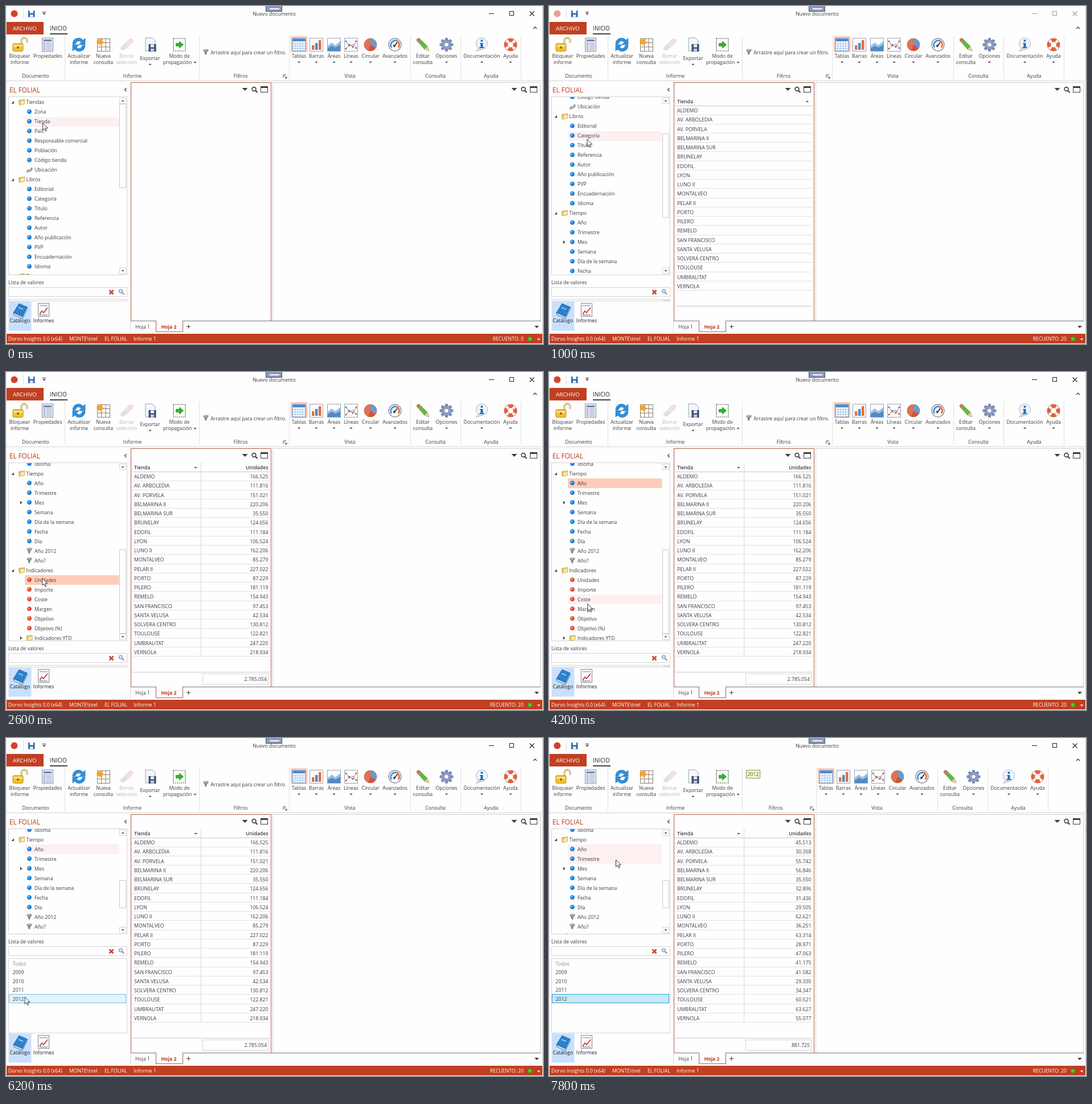
Recreate the animation shown at these times as an HTML page. Size 943 by 594 pixels, loop 8 s.

```html
<!DOCTYPE html>
<html lang="es">
<head>
<meta charset="utf-8">
<title>Nuevo documento</title>
<style>
html, body { margin: 0; width: 100%; height: 100%; overflow: hidden; background: #fefefe; }
svg { display: block; width: 943px; height: 594px; font: 8.7px "Open Sans", "Noto Sans", sans-serif; }
</style>
</head>
<body>
<svg id="stage" viewBox="0 0 943 594"></svg>
<script>
const ACCENT = '#c13f22', EDGE = '#ad5c49', INK = '#3c3c3c', LINE = '#d4d4d4', PAPER = '#fefefe';
const LOOP = 8000, STEP = 200;

// Drawing helpers; text is placed by its vertical centre.
const text = (x, y, s, o = {}) =>
  `<text x="${x}" y="${y + (o.size || 8.7) * 0.37}" fill="${o.fill || INK}" text-anchor="${o.anchor || 'start'}"` +
  ` font-size="${o.size || 8.7}" font-weight="${o.weight || 400}">${s}</text>`;
const mid = (x, y, s, o) => text(x, y, s, { anchor: 'middle', ...o });
const rect = (x, y, w, h, fill = 'none', stroke = 'none', rx = 0) =>
  `<rect x="${x}" y="${y}" width="${w}" height="${h}" rx="${rx}" fill="${fill}" stroke="${stroke}"/>`;
const path = (d, fill = 'none', stroke = 'none', w = 1) =>
  `<path d="${d}" fill="${fill}" stroke="${stroke}" stroke-width="${w}"/>`;
const line = (x1, y1, x2, y2, stroke = LINE, w = 1) => path(`M${x1} ${y1}L${x2} ${y2}`, 'none', stroke, w);
const dot = (x, y, r, fill, stroke = 'none', w = 1) =>
  `<circle cx="${x}" cy="${y}" r="${r}" fill="${fill}" stroke="${stroke}" stroke-width="${w}"/>`;
const at = (x, y, s, extra = '') => `<g transform="translate(${x} ${y}) ${extra}">${s}</g>`;
const down = (x, y, r = 3, fill = INK) => path(`M${x - r} ${y - r / 2}h${2 * r}l${-r} ${r}z`, fill);
const up = (x, y, r = 3) => path(`M${x - r} ${y + r / 2}h${2 * r}l${-r} ${-r}z`, INK);

const funnel = path('M-4.5 -3.5Q0 -6 4.5 -4L1 1 .5 4.5 -1.5 3V.5Z', '#8d8d8d', '#5a5a5a', .7) + line(-3, -3.3, 2.5, -3.6, '#e6e6e6', 1.2);
const lens = (colour, w) => dot(-1, -1, 3.4, 'none', colour, w) + line(1.5, 1.5, 5, 5, colour, w + .5);
const finder = line(0, 0, 4.5, 4.5, '#c08a45', 2) + dot(-1.5, -1.5, 3, '#cfe5fa', '#5f97d2', 1.1);
const folder = path('M-5 -3L-1 -4.5 0 -3.5 5 -5V3L-4 5Z', '#edc95c', '#b08b35', .7) + path('M-2 -2L5 -4V3L-3 5Z', '#fde9a0', '#c09b45', .5);
const sheet = path('M-8 -12H4L9 -7V11H-8Z', '#f4f6fa', '#8f99aa', .9);
const box = rect(-11.5, -11.5, 23, 23, PAPER, '#98a3b2');
const bars = (heights, colours) => heights.map((h, i) => rect(-8 + i * 6, 9 - h, 4.5, h, colours[i])).join('');

const icons = {
  lock: path('M3 -2V-7a5 5 0 0 1 10 0v4', 'none', '#a58d45', 2.8) + path('M3 -2V-7a5 5 0 0 1 10 0v4', 'none', '#f1e0a0', 1.5) +
    rect(-12, -2, 18, 13.5, '#efc032', '#b98e1c', 2) + rect(-11, 0, 16, 4, '#fbdc70') + dot(-3, 5, 1.8, '#70510b'),
  props: rect(-9.5, -12, 19, 24, '#e4e7f3', '#8a94b2') + rect(-7, -9, 14, 3, '#7383aa') +
    [-3, 0, 3, 6, 9].map(y => line(-7, y, -4, y, '#6f80a8', 1.2) + line(-2, y, 7, y, '#98a3bf', 1)).join(''),
  refresh: [0, 180].map(a => `<g transform="rotate(${a})">` +
    path('M-11 -1C-11 -12 2 -15 7 -8L11 -11V0H0L4 -4C0 -9 -5 -6 -6 -1Z', '#2f90dc', '#1c6cb2', .6) + '</g>').join(''),
  grid: rect(-10.5, -10.5, 22, 22, PAPER, '#8d7d70') + [-3.5, 4].map(v => line(v, -10, v, 11, '#8d7d70') + line(-10, v, 11, v, '#8d7d70')).join('') +
    path('M-6 -12L-4.5 -8.5 -1 -10 -2 -6.5 1 -5 -2 -3.5 -1 0 -4.5 -1.5 -6 2 -7.5 -1.5 -11 0 -10 -3.5 -13 -5 -10 -6.5 -11 -10 -7.5 -8.5Z', '#f6a51d'),
  eraser: path('M-11 6L4 -9Q7 -12 11 -8 12 -6 10 -4L-4 9Q-9 11 -11 6Z', '#f5e0db', '#dfcac5', .7) + path('M-11 6L-4 -1 3 3 -4 9Q-9 11 -11 6Z', '#dfdfe9'),
  exporter: sheet + rect(-2, -.5, 12, 12, '#46557a', '#33405f') + rect(1, -.5, 6, 5, '#e8edf6') + rect(1, 7, 6, 4.5, '#c6d0e2'),
  spread: `<rect x="-10.5" y="-11" width="21" height="22" fill="#f7fff4" stroke="#3d4b3d" stroke-width="1.2" stroke-dasharray="2 1.5"/>` +
    path('M-6 -2.5H0V-6L7 0 0 6V2.5H-6Z', '#35b22b', '#1f7f1b', .7),
  table: rect(-11.5, -11, 23, 22, PAPER, '#4b80bd') + rect(-11, -10.5, 22, 4.5, '#4a8ad0') +
    [-1.5, 2.5, 6.5].map(y => line(-11, y, 11, y, '#90b5df', .8)).join('') + [-7, -2.5, 2, 6.5].map(x => line(x, -6, x, 11, '#90b5df', .8)).join(''),
  bars: box + bars([8, 12, 17], ['#e3703d', '#4a8ac8', '#e3703d']),
  areas: box + path('M-11 2L-4 -4 2 1 11 -6V11H-11Z', '#96c0e6') + path('M-11 6L-4 2 3 5 11 0V11H-11Z', '#4f8bc6'),
  lines: box + path('M-9 7L-3 0 3 4 9 -6', 'none', '#d7603f', 1) + path('M-9 -6L-3 3 3 -1 9 6', 'none', '#6b7b99', 1) +
    [[-9, 7], [-3, 0], [3, 4], [9, -6], [-9, -6], [9, 6]].map(([x, y]) => dot(x, y, 1.3, '#6b4250')).join(''),
  pie: dot(0, 0, 11, '#e0744f', '#a95c44', .7) + path('M0 0V-11A11 11 0 0 1 9 6Z', '#6b9ace') + path('M0 0L9 6A11 11 0 0 1 -4 10Z', '#d8503a'),
  gauge: dot(0, 0, 11, '#f7f9fc', '#8b95a2', 1.4) + path('M-6 5A8 8 0 0 1 3 -7', 'none', '#4590d4', 2.6) + path('M3 -7A8 8 0 0 1 6 5', 'none', '#e2694a', 2.6) +
    line(-2, 4, 4, -4, '#333', 1.8) + dot(-1, 2, 2, '#444'),
  pencil: path('M-11 -8Q-10 -12 -6 -11L8 3 11 11 3 8Z', '#6ab643', '#418429', .7) + path('M3 8L8 3 11 11Z', '#f1cf94') + path('M-11 -8Q-10 -12 -6 -11L-4 -9 -9 -4Z', '#e46c60'),
  gear: [0, 45, 90, 135].map(a => `<rect x="-2.5" y="-12" width="5" height="24" rx="1" fill="#7c8eb6" transform="rotate(${a})"/>`).join('') +
    dot(0, 0, 8.5, '#8f9ec4', '#6d7da4') + dot(0, 0, 4, PAPER, '#6d7da4'),
  info: path('M-6 6L-10 12 1 8Z', '#d9e3f1', '#9aabc1', .7) + dot(0, -2, 10, '#eef3fb', '#a9b7ca') + dot(0, -7, 2, '#236dbb') + path('M-3 -3H2V4H4V6H-4V4H-2V-1H-3Z', '#236dbb'),
  buoy: dot(0, 0, 8, 'none', '#e75f3b', 6.5) + `<circle r="8" fill="none" stroke="#f6f6f6" stroke-width="6.5" stroke-dasharray="4.5 8.07" stroke-dashoffset="-4"/>` + dot(0, 0, 11, 'none', '#bd5a40', .6),
};

const button = (x, icon, label, opts = {}) => at(x, 68, icons[icon]) +
  label.split('|').map((s, i) => mid(x, (opts.y || 88) + i * 11, s, { fill: opts.fill })).join('') +
  (opts.arrow ? down(x, opts.arrow, 2.6) : '');
const divider = x => line(x, 52, x, 128, '#e0e0e0');

const paneTools = x => down(x, 146.5, 5) + at(x + 17, 147, lens(INK, 1.6)) +
  rect(x + 28, 141.5, 12, 10, PAPER, INK) + rect(x + 27.5, 141, 13, 3, INK);

const ribbonLeft = button(24, 'lock', 'Bloquear|informe') + button(73, 'props', 'Propiedades') + divider(103.5) +
  button(128, 'refresh', 'Actualizar|informe') + button(171, 'grid', 'Nueva|consulta') +
  button(212, 'eraser', 'Borrar|selección', { fill: '#b9b9b9' }) + button(253, 'exporter', 'Exportar', { y: 92, arrow: 103 }) +
  button(304.5, 'spread', 'Modo de') + mid(301, 99, 'propagación') + down(332, 99.5, 2.6) + divider(339.5) +
  mid(52, 123, 'Documento') + mid(222, 123, 'Informe');

const menu = { arrow: 99 };
const ribbonRight = path('M487 126V121H492M489 123L493 127M493 124V127H490', 'none', INK, .9) + divider(497.5) +
  rect(500, 53, 29.5, 28, '#ffcdb9') + button(514.5, 'table', 'Tablas', menu) + button(545, 'bars', 'Barras', menu) +
  button(576, 'areas', 'Áreas', menu) + button(606, 'lines', 'Líneas', menu) + button(640, 'pie', 'Circular', menu) +
  button(683, 'gauge', 'Avanzados', menu) + divider(710.5) + button(732, 'pencil', 'Editar|consulta') +
  button(773.5, 'gear', 'Opciones', menu) + divider(798.5) + button(835.5, 'info', 'Documentación', menu) +
  button(886, 'buoy', 'Ayuda', menu) + divider(904.5) + mid(604, 123, 'Vista') + mid(754, 123, 'Consulta') + mid(852, 123, 'Ayuda');

const chrome = rect(0, 0, 943, 594, PAPER) + line(30.5, 4, 30.5, 23, '#ddd') +
  rect(456.5, -.5, 28, 10, '#8d9abb', '#414d70') + rect(463, 4, 17, 2, '#fff') +
  mid(471, 14, 'Nuevo documento', { size: 8.8 }) +
  rect(1, 28, 65, 22, ACCENT) + mid(33, 39.5, 'ARCHIVO', { size: 9.8, fill: '#fff' }) +
  mid(92, 39.5, 'INICIO', { size: 9.9, fill: '#222' }) + rect(77, 48, 31, 2, '#444') +
  path('M926 40L929 37 932 40', 'none', INK, 1.3) + line(0, 131.5, 943, 131.5, LINE) + ribbonLeft +
  text(6, 148, 'EL FOLIAL', { size: 11.8, fill: '#b83a1d' }) + path('M211.5 144L208.5 147 211.5 150', 'none', INK, 1.2) +
  rect(219.5, 134.5, 246, 419, PAPER, EDGE) + rect(468.5, 134.5, 470, 419, PAPER, '#cfcfcf') + paneTools(419.5) + paneTools(892.5) +
  line(219, 553.5, 939, 553.5, '#777') + line(218.5, 554, 218.5, 573, LINE) + mid(240, 564, 'Hoja 1') +
  path('M263.5 553V572.5H310.5V553', PAPER, EDGE) + mid(286, 564, 'Hoja 2', { weight: 700, fill: '#b23a1f' }) +
  path('M317 563.5H324M320.5 560V567', 'none', INK, 1.1) + down(932, 564, 4) +
  rect(4.5, 519.5, 40, 51, '#c9e0fc') +
  at(25, 536, path('M-12 3L-2 -13 12 -7 4 10Z', '#2a82cc', '#155898', .8) + path('M-12 3L4 10 12 -7V-3L4 13 -11 7Z', '#d9e8f5', '#165b9b', .8) + line(-3, -6, 5, -3, '#a9d6fa', 1.6)) +
  mid(24.5, 553, 'Catálogo', { fill: '#1c1c1c' }) +
  at(66, 534, rect(-9.5, -11.5, 19, 23, PAPER, '#7b8697') + rect(-7, -9, 14, 3, '#c3ccd9') + path('M-7 8L-3 2 0 5 7 -4', 'none', '#cf302c', 1.6) + line(-7, 9, 7, 9, '#666')) +
  mid(66, 553, 'Informes', { fill: '#1c1c1c' }) + rect(1, 576, 941, 17, ACCENT) +
  [[4, 'Dorvo Insights 0.0 (x64)'], [111, 'MONTE\\tirel'], [173, 'EL FOLIAL'], [224, 'Informe 1']].map(([x, s]) => text(x, 585, s, { fill: '#fff' })).join('') +
  dot(920, 585, 3.8, '#4fcb2d', '#2f8a1c') + down(935.5, 586, 2.8, '#fff') +
  line(.5, 0, .5, 575, '#e2e2e2') + line(942.5, 0, 942.5, 575, '#c9c9c9');

// '#' folder, '>' and '@' collapsed branches, '~' location, '?' filter, '*' measure.
const tree = ('#Tiendas,Zona,Tienda,País,Responsable comercial,Población,Código tienda,~Ubicación,' +
  '#Libros,Editorial,Categoría,Título,Referencia,Autor,Año publicación,PVP,Encuadernación,Idioma,' +
  '#Tiempo,Año,Trimestre,>Mes,Semana,Día de la semana,Fecha,Día,?Año 2012,?Año?,' +
  '#Indicadores,*Unidades,*Importe,*Coste,*Margen,*Objetivo,*Objetivo (%),@Indicadores YTD').split(',');
const ROW = 17, STORE = 2, YEAR = 19, UNITS = 29;
const ball = (fill, rim) => dot(41, -.4, 3.6, fill, rim, .7) + dot(40, -1.7, 1.4, '#ffffff80');
const branch = path('M25 -3L28.5 0 25 3Z', INK);

function treeRow(item, y) {
  const kind = '#>~?*@'.includes(item[0]) ? item[0] : '';
  const name = kind ? item.slice(1) : item;
  const blue = ball('#1b88ea', '#1268bd');
  const glyph = {
    '#': path('M14 -2V2.5H9.5Z', INK) + at(27.5, 0, folder),
    '@': branch + at(41, 0, folder),
    '>': branch + blue,
    '~': path('M36 3Q38 -1 41 0T45 -4Q48 -1 43 2T36 3Z', '#ccc', '#666', 1),
    '?': at(41, 0, funnel),
    '*': ball('#ee5233', '#bd3a22'),
  }[kind] || blue;
  return at(0, y, glyph + text(kind === '#' ? 35.5 : 50, 0, name));
}

const stores = ('ALDEMO,AV. ARBOLEDIA,AV. PORVELA,BELMARINA II,BELMARINA SUR,BRUNELAY,EDOFIL,LYON,LUNO II,MONTALVEO,' +
  'PELAR II,PORTO,PILERO,REMELO,SAN FRANCISCO,SANTA VELUSA,SOLVERA CENTRO,TOULOUSE,UMBRALITAT,VERNOLA').split(',');
const allUnits = [166525, 111816, 151021, 220206, 35550, 124656, 111184, 106524, 162206, 85279,
  227022, 87229, 181119, 154943, 97453, 42534, 130812, 122821, 247220, 218934];
const yearUnits = [45513, 30358, 55742, 56846, 35550, 32896, 31436, 29505, 62621, 36251,
  63314, 28971, 47063, 41175, 41582, 29330, 34347, 60521, 63627, 55077];
const dotted = n => String(n).replace(/\B(?=(\d{3})+$)/g, '.');

function drawTable(units, total) {
  const right = { anchor: 'end' }, pitch = 16.24;
  let s = text(225, 167.5, 'Tienda', { weight: 600 }) + up(units ? 333 : 453.5, 167.5, 2.7) +
    line(222, 175.5, 463, 175.5, '#c8c8c8') + line(222, 527.5, 463, 527.5, '#c8c8c8');
  stores.forEach((name, i) => {
    const y = 184 + i * pitch, rule = Math.floor(y + 8) - .5;
    s += text(225, y, name, { size: 8.8 }) + line(222, rule, 463, rule, '#e1e1e1');
    if (units) s += text(460.5, y, dotted(units[i]), right);
  });
  if (units) s += text(460.5, 167.5, 'Unidades', { ...right, weight: 600 }) + line(342.5, 159, 342.5, 500, '#d8d8d8') +
    rect(345.5, 530.5, 115, 18, PAPER, LINE) + text(458, 539.5, dotted(total), right);
  return s;
}

// Keys are [ms, value...]; values run linearly between them.
function tween(keys, t) {
  const i = keys.findIndex(k => k[0] > t);
  if (i < 0) return keys[keys.length - 1].slice(1);
  if (!i) return keys[0].slice(1);
  const a = keys[i - 1], b = keys[i], p = (t - a[0]) / (b[0] - a[0]);
  return a.slice(1).map((v, j) => v + (b[j + 1] - v) * p);
}
const pointerKeys = [[600, 64.5, 205.5], [1000, 67, 234], [1200, 67, 240], [2000, 64, 362.5], [2600, 64, 362.5], [3200, 66, 197],
  [3600, 66, 197], [3800, 66, 240], [4200, 68, 407.5], [4600, 78, 476], [4800, 78, 477], [5000, 78, 477], [5400, 73.5, 473],
  [5800, 68, 345.5], [6200, 33, 455], [6600, 33, 455], [7200, 440, 85], [7400, 531, 68], [7800, 117.5, 214]];
const scrollKeys = [[800, 0], [1000, 111], [1200, 111], [1800, 296.5]];
const splitKeys = [[5400, 472.5], [5800, 344.5]];

const arrow = path('M0 0V12.5L2.9 9.9 4.8 14.4 6.8 13.5 4.9 9.1H8.8Z', '#fff', '#222', .9);
const resizer = path('M0 -8L4 -4H1V4H4L0 8 -4 4H-1V-4H-4Z', '#fff', '#222', 1) + line(-4, 0, 4, 0, '#222', 1.6);
const clip = (id, x, y, w, h) => `<clipPath id="${id}">${rect(x, y, w, h)}</clipPath>`;

function drawTitle(active) {
  const ink = active ? '#222' : '#999';
  return dot(14.5, 13.5, 6, active ? '#d6412b' : '#ea9f94') +
    rect(39, 8, 11.5, 11.5, '#2a67b2') + rect(41.5, 8, 6.5, 4.5, '#fff') + rect(42, 15, 5.5, 4.5, '#e4edf8') +
    line(64, 10.5, 70, 10.5, INK) + down(67, 14, 3) + line(848, 13.5, 857, 13.5, ink) +
    rect(884.5, 9.5, 7, 7, 'none', ink) + path('M919.5 9.5L927.5 17.5M927.5 9.5L919.5 17.5', 'none', ink, 1.1);
}

function drawTree(t, split, scroll, x, y) {
  const view = split - 159.5, track = view - 25, whole = tree.length * ROW;
  const selected = t < 200 ? -1 : t < 2200 ? STORE : t < 3600 ? UNITS : YEAR;
  const dragging = t >= 6600 && t < 7200;
  const over = !dragging && x > 18 && x < 199 && y > 160 && y < split ? Math.floor((y + scroll - 160.5) / ROW) : -1;
  let rows = '';
  tree.forEach((item, i) => {
    const rowY = 169 + i * ROW - scroll;
    if (rowY < 150 || rowY > split + 10) return;
    const strong = i === selected && t < 6000;
    if (strong || i === selected || i === over) rows += rect(33, Math.round(rowY - 8.5), 165.5, ROW, strong ? '#ffcdb9' : '#fdf0f1');
    rows += treeRow(item, rowY);
  });
  return clip('treeClip', 5, 160, 194, view - 1) + rect(4.5, 159.5, 208, view, PAPER, LINE) +
    `<g clip-path="url(#treeClip)">${rows}</g>` +
    rect(199.5, 161.5, 11, 10, PAPER, LINE) + up(205, 166.5, 2.5) +
    rect(199.5, split - 12, 11, 10, PAPER, LINE) + down(205, split - 7, 2.5) +
    rect(199.5, Math.round(172 + track * scroll / whole) + .5, 11, Math.round(track * view / whole), PAPER, '#cacaca');
}

function drawValues(t, split, x, y) {
  const top = split + 43, height = 518.5 - top;
  const filled = (t >= 400 && t < 2200) || t >= 3600;
  let s = text(4, split + 13.5, 'Lista de valores') + rect(4.5, split + 22, 208, 16, PAPER, LINE) +
    path(`M181.5 ${split + 27}l7 7m0 -7l-7 7`, 'none', '#c9433b', 2.6) + at(203, split + 30, finder) +
    rect(4.5, top, 208, height, PAPER, LINE);
  if (height < 20) return s + (filled ? rect(200, top + 1, 12, 2, '#d9d9d9') : '');
  const rows = ['Todos', 2009, 2010, 2011, 2012].map((value, i) => {
    const rowY = top + 9 + i * 15.45, chosen = i === 4 && t >= 6400;
    const over = x > 5 && x < 211 && Math.abs(y - rowY) < 7.7;
    const mark = (fill, stroke) => rect(5.5, Math.round(rowY) - 7.5, 205, 15, fill, stroke);
    return (chosen ? mark('#cbe8f6', '#26a0da') : over ? mark('#e5f3fb', '#70c0e7') : '') +
      text(11.5, rowY, value, { fill: i ? INK : '#858585' });
  }).join('');
  return s + clip('valueClip', 5, top, 207, height) + `<g clip-path="url(#valueClip)">${rows}</g>`;
}

function drawFilter(on) {
  return on ? rect(346.5, 56.5, 24, 14, '#ffffcf', '#8c8766') + mid(358.5, 63.7, '2012') + mid(398, 123, 'Filtros')
    : at(351, 81, funnel) + text(359.3, 82, 'Arrastre aquí para crear un filtro.') + mid(412, 123, 'Filtros');
}

const stage = document.getElementById('stage');
stage.innerHTML = chrome + '<g id="live"></g>';
const live = document.getElementById('live');

function draw(t) {
  const [x, y] = tween(pointerKeys, t), [scroll] = tween(scrollKeys, t), [split] = tween(splitKeys, t);
  const active = !((t >= 600 && t < 1400) || t === 2400);
  const filtered = t >= 7200, counted = t >= 800;
  const table = !counted ? '' : t < 2600 ? drawTable() : filtered ? drawTable(yearUnits, 881725) : drawTable(allUnits, 2785054);
  live.innerHTML = drawTitle(active) + drawFilter(filtered) + at(filtered ? -28 : 0, 0, ribbonRight) + table +
    drawTree(t, split, scroll, x, y) + drawValues(t, split, x, y) +
    text(909, 585, `RECUENTO: ${counted ? 20 : 0}`, { fill: '#fff', anchor: 'end' }) +
    at(x, y, t >= 4600 && t <= 5800 ? resizer : arrow);
}

let shown = -1;
const start = performance.now();
function tick() {
  const t = Math.floor((performance.now() - start) % LOOP / STEP) * STEP;
  if (t !== shown) draw(shown = t);
  requestAnimationFrame(tick);
}
tick();
</script>
</body>
</html>
```
